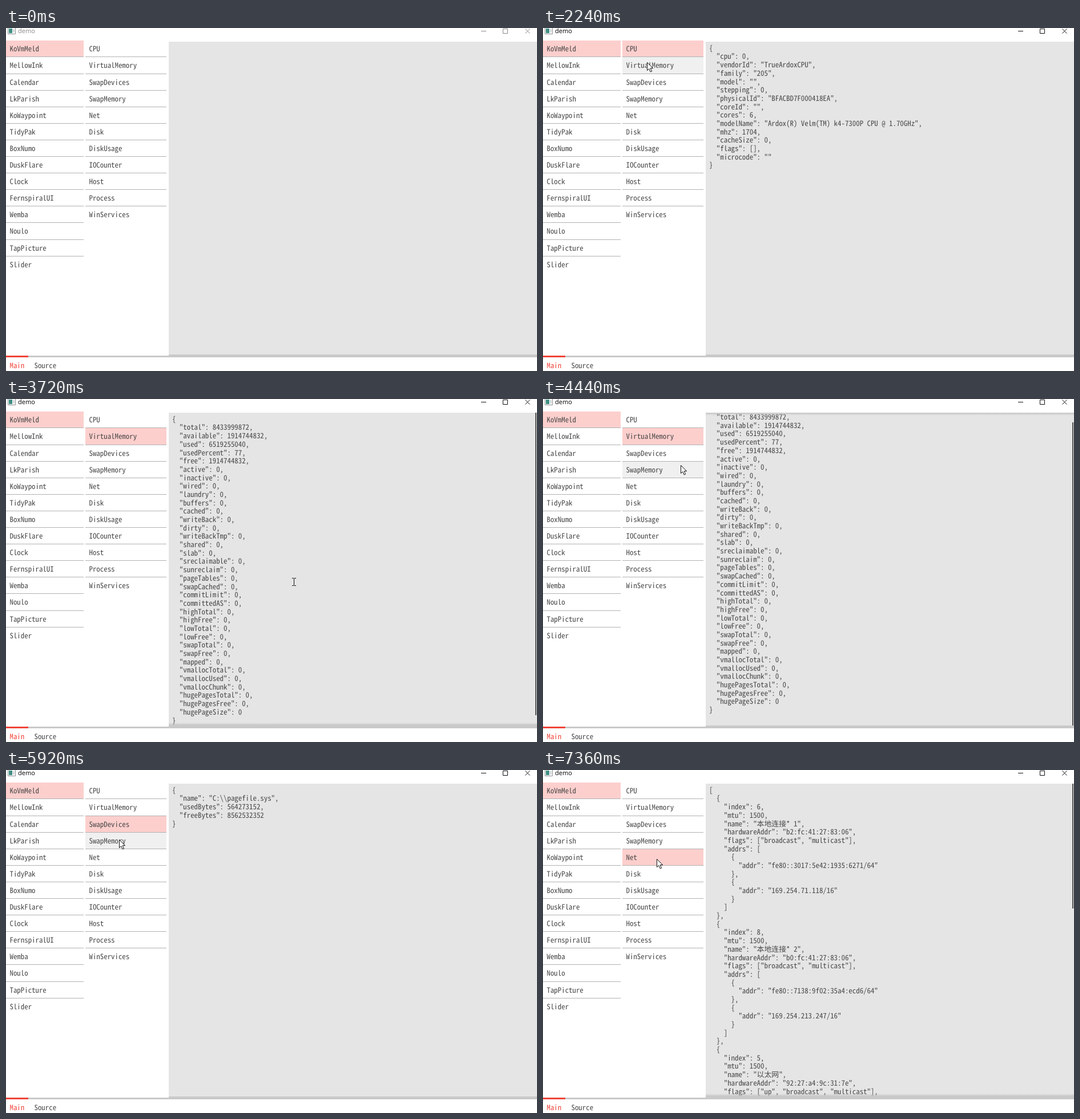
These frames come from a looping animation (930x602 px, 8000 ms). An HTML page:

```html
<!DOCTYPE html>
<html lang="en">
<head>
<meta charset="utf-8">
<title>demo</title>
<style>
  html, body { margin: 0; width: 100%; height: 100%; overflow: hidden; background: #fff; }
  #stage {
    position: relative; width: 930px; height: 602px; overflow: hidden; color: #484848;
    font: 12.86px "Noto Sans Mono CJK SC", "Noto Sans Mono CJK JP", "Liberation Mono", "Noto Sans CJK SC", monospace;
    letter-spacing: calc(6.43px - 1ch);
    text-rendering: geometricPrecision;
  }
  #stage div, #stage pre, #stage svg { position: absolute; margin: 0; }
  .row { line-height: 27px; white-space: pre; box-sizing: border-box; padding-left: 6.5px; }
  .line { height: 1px; background: #b2b2b2; }
  .hover { background: #f0f0f0; }
  .selected { background: #fccfcd; }
  #title { left: 21px; top: -2px; font: 11px/15px "Open Sans", sans-serif; letter-spacing: 0; }
  #panel { left: 285px; top: 24px; width: 645px; height: 549px; background: #e5e5e5; overflow: hidden; }
  #text { left: 6px; font: inherit; line-height: 14.69px; }
  #shade-top, #shade-bottom { left: 0; width: 100%; height: 5px; }
  #shade-top { top: 0; background: linear-gradient(#c4c4c4, #e5e5e500); }
  #shade-bottom { bottom: 0; background: linear-gradient(#e5e5e500, #c4c4c4); }
  #thumb { right: 1px; width: 2px; background: #505050; }
  .bar { background: #c9c9c9; }
  .tab { top: 582px; line-height: 20px; }
  #arrow, #beam { left: 0; top: 0; }
</style>
</head>
<body>
<div id="stage">
  <svg id="chrome" width="930" height="14" fill="none" stroke="currentColor">
    <path d="M3.5 -1V10.5H16.5V-1" stroke="#8a8f92" fill="#fff"/>
    <path d="M5 1h6v8H5z" fill="#3f8f83" stroke="none"/>
    <path d="M12 2h3v6h-3z" fill="#d5dadd" stroke="none"/>
    <path d="M832 5.5h9M870.5 1.5h8v8h-8zM909.5 1.5l8 8M917.5 1.5l-8 8"/>
  </svg>
  <div id="title">demo</div>
  <div id="panel">
    <pre id="text"></pre>
    <div id="shade-top"></div>
    <div id="shade-bottom"></div>
    <div id="thumb"></div>
  </div>
  <div class="bar" style="left:0;top:575px;width:285px;height:3px"></div>
  <div class="bar" style="left:285px;top:573px;width:645px;height:5px"></div>
  <div style="left:0;top:575px;width:39px;height:3px;background:#f04438"></div>
  <div class="tab" style="left:6.5px;color:#f04438">Main</div>
  <div class="tab" style="left:49.5px">Source</div>
  <svg id="arrow" width="14" height="22">
    <path d="M.5 .5V14.5L3.8 11.5 6.2 17 8.6 16 6.2 10.6H10.6Z" fill="#fff" stroke="#111"/>
  </svg>
  <svg id="beam" width="7" height="15" fill="none" stroke="#111">
    <path d="M0 .5H3M4 .5H7M3.5 1V13M0 13.5H3M4 13.5H7"/>
  </svg>
</div>
<script>
const $ = id => document.getElementById(id);
const PITCH = 29.1, LOOP = 8000, VIEW = 549;

function addMenu(left, width, labels) {
  return labels.map((label, i) => {
    const top = i ? Math.floor(50.9 + PITCH * (i - 1)) + 1 : 22;
    const bottom = Math.floor(50.9 + PITCH * i);
    const add = (cls, y, height) => {
      const el = document.createElement('div');
      el.className = cls;
      el.style.cssText = `left:${left}px;top:${y}px;width:${width}px;height:${height}px`;
      return $('stage').insertBefore(el, $('arrow'));
    };
    const row = add('row', top, bottom - top);
    row.textContent = label;
    if (i < labels.length - 1) add('line', bottom, 1);
    return row;
  });
}

const apps = addMenu(0, 136, ['KoVmMeld', 'MellowInk', 'Calendar', 'LkParish', 'KoWaypoint', 'TidyPak',
  'BoxNumo', 'DuskFlare', 'Clock', 'FernspiralUI', 'Wemba', 'Noulo', 'TapPicture', 'Slider']);
const calls = addMenu(139, 142, ['CPU', 'VirtualMemory', 'SwapDevices', 'SwapMemory', 'Net', 'Disk',
  'DiskUsage', 'IOCounter', 'Host', 'Process', 'WinServices']);
apps[0].classList.add('selected');

const pretty = value => JSON.stringify(value, null, 2);
const zeros = names => Object.fromEntries(names.split(' ').map(name => [name, 0]));

const cpu = pretty({
  cpu: 0, vendorId: 'TrueArdoxCPU', family: '205', model: '', stepping: 0,
  physicalId: 'BFACBD7F000418EA', coreId: '', cores: 6,
  modelName: 'Ardox(R) Velm(TM) k4-7300P CPU @ 1.70GHz',
  mhz: 1704, cacheSize: 0, flags: [], microcode: ''
});

const memory = pretty({
  total: 8433999872, available: 1914744832, used: 6519255040, usedPercent: 77, free: 1914744832,
  ...zeros('active inactive wired laundry buffers cached writeBack dirty writeBackTmp shared slab ' +
    'sreclaimable sunreclaim pageTables swapCached commitLimit committedAS highTotal highFree ' +
    'lowTotal lowFree swapTotal swapFree mapped vmallocTotal vmallocUsed vmallocChunk ' +
    'hugePagesTotal hugePagesFree hugePageSize')
});

const devices = pretty({ name: 'C:\\pagefile.sys', usedBytes: 564273152, freeBytes: 8562532352 });

const swap = pretty({
  total: 17560805376, used: 11655921664, free: 5904883712, usedPercent: 66.37464179137201,
  ...zeros('sin sout pgIn pgOut pgFault pgMajFault')
});

const adapter = (index, name, hardwareAddr, flags, ...addrs) =>
  ({ index, mtu: 1500, name, hardwareAddr, flags, addrs: addrs.map(addr => ({ addr })) });
const cast = ['broadcast', 'multicast'];
const net = pretty([
  adapter(6, '本地连接* 1', 'b2:fc:41:27:83:06', cast, 'fe80::3017:5e42:1935:6271/64', '169.254.71.118/16'),
  adapter(8, '本地连接* 2', 'b0:fc:41:27:83:06', cast, 'fe80::7138:9f02:35a4:ecd6/64', '169.254.213.247/16'),
  adapter(5, '以太网', '92:27:a4:9c:31:7e', ['up', ...cast])
]).replace(/("flags": )\[([^\]]*)\]/g, (_, key, list) => `${key}[${list.trim().replace(/\s+/g, ' ')}]`);

const arrow = (x, y) => ({ shape: 'arrow', x, y });
const beam = (x, y) => ({ shape: 'beam', x: x - 3, y: y - 7 });

// thumb: top and bottom of the scroll handle inside the panel
const memoryView = { active: true, selected: 1, text: memory, thumb: [0, 531] };
const deviceView = { active: true, selected: 2, text: devices };
const scenes = [
  { at: 0 },
  { at: 800, cursor: beam(373, 200) },
  { at: 1520, hover: 0, cursor: arrow(165, 35) },
  { at: 2240, active: true, selected: 0, hover: 1, text: cpu, cursor: arrow(182, 60) },
  { at: 3000, ...memoryView, cursor: arrow(183, 72) },
  { at: 3720, ...memoryView, cursor: beam(504, 321) },
  { at: 4440, ...memoryView, hover: 3, scroll: 18.4, thumb: [17, VIEW], cursor: arrow(241, 116) },
  { at: 5160, ...deviceView, cursor: beam(429, 171) },
  { at: 5920, ...deviceView, hover: 3, cursor: arrow(198, 122) },
  { at: 6640, active: true, selected: 3, text: swap, cursor: beam(366, 127) },
  { at: 7360, active: true, selected: 4, text: net, thumb: [0, 219], cursor: arrow(199, 156) }
];

function show({ active, selected, hover, text = '', scroll = 0, thumb, cursor }) {
  $('title').style.color = active ? '#000' : '#888';
  $('chrome').style.color = active ? '#111' : '#888';
  calls.forEach((row, i) => {
    row.classList.toggle('selected', i === selected);
    row.classList.toggle('hover', i === hover);
  });
  $('text').textContent = text;
  $('text').style.top = 3.8 - scroll + 'px';
  const [top, bottom] = thumb || [0, 0];
  $('thumb').style.top = top + 'px';
  $('thumb').style.height = bottom - top + 'px';
  $('shade-top').hidden = top === 0;
  $('shade-bottom').hidden = !thumb || bottom === VIEW;
  for (const shape of ['arrow', 'beam']) {
    const on = cursor && cursor.shape === shape;
    $(shape).style.display = on ? 'block' : 'none';
    if (on) $(shape).style.transform = `translate(${cursor.x}px, ${cursor.y}px)`;
  }
}

let current;
function tick() {
  const time = performance.now() % LOOP;
  const scene = scenes.findLast(s => s.at <= time);
  if (scene !== current) show(current = scene);
  requestAnimationFrame(tick);
}
tick();
</script>
</body>
</html>
```
